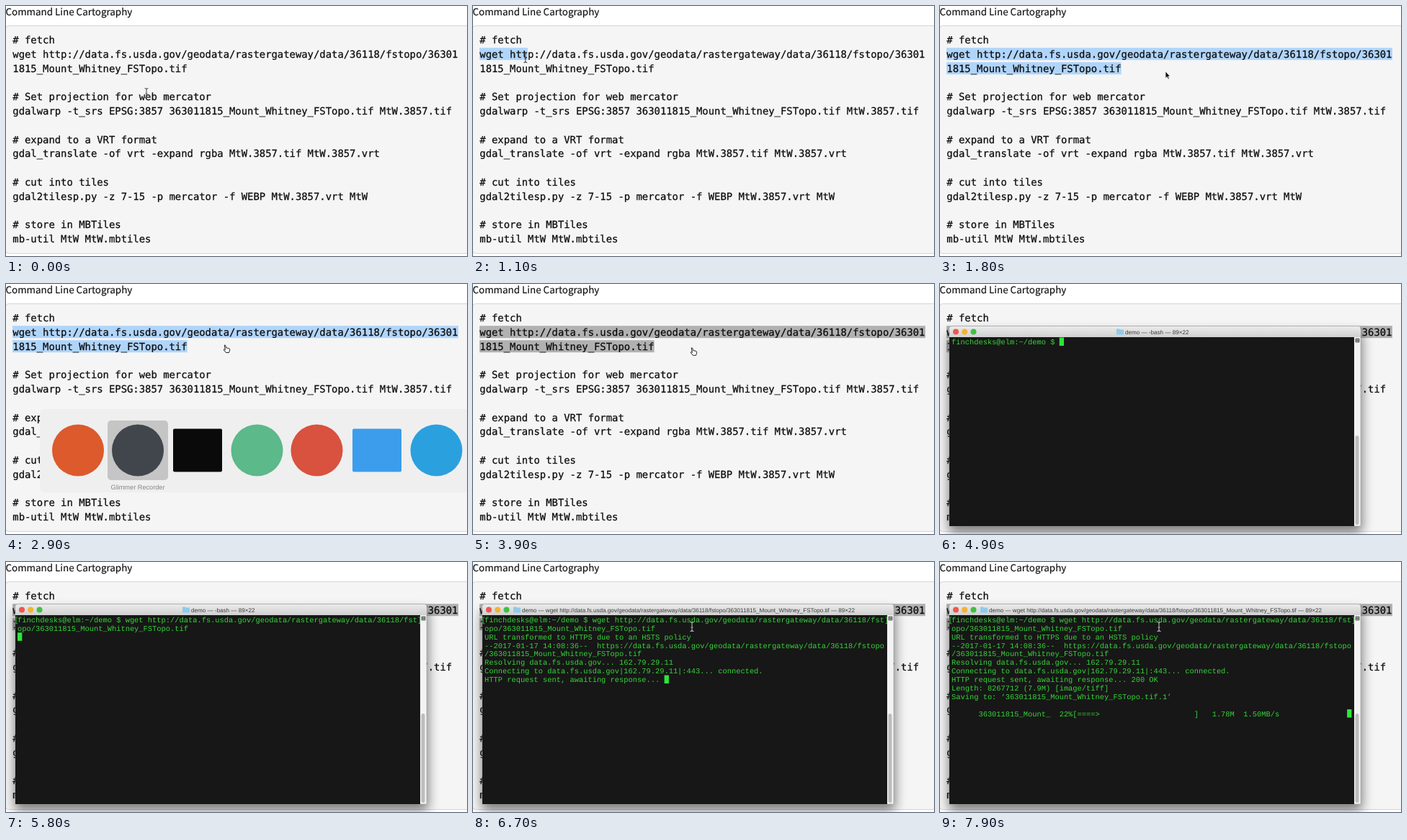
Write an HTML page that moves like this. It is 640 px wide and 348 px high and loops after 8 s.

```html
<!DOCTYPE html>
<html lang="en">
<head>
<meta charset="utf-8">
<title>Command Line Cartography</title>
<style>
  html, body { margin: 0; width: 100%; height: 100%; overflow: hidden; background: #fff; }
  svg { display: block; width: 100vw; height: 100vh; }
  text { white-space: pre; text-rendering: geometricPrecision; }
  .heading { font: 13.42px "Noto Sans CJK SC", "Noto Sans CJK JP", "Noto Sans", sans-serif; fill: #111; stroke: #111; stroke-width: .15; }
  .code { font: 13.895px "DejaVu Sans Mono", monospace; fill: #0c0c0c; stroke: #0c0c0c; stroke-width: .25; }
  .term { font: 10.4px "Liberation Mono", monospace; fill: #35d438; }
  .bar { font: 8.1px "Liberation Sans", sans-serif; fill: #3c3c3c; }
  .label { font: 9.2px "Liberation Sans", sans-serif; fill: #858585; text-anchor: middle; }
</style>
</head>
<body>
<svg viewBox="0 0 640 348" preserveAspectRatio="none">
  <defs>
    <linearGradient id="barFill" x1="0" y1="0" x2="0" y2="1">
      <stop offset="0" stop-color="#ebebeb"/><stop offset="1" stop-color="#d0d0d0"/>
    </linearGradient>
    <linearGradient id="ghostFill">
      <stop offset="0" stop-color="#6a6a6a"/><stop offset=".36" stop-color="#8c8c8c"/>
      <stop offset=".46" stop-color="#bdbdbd"/><stop offset="1" stop-color="#e0e0e0"/>
    </linearGradient>
    <filter id="shadow" x="-10%" y="-10%" width="120%" height="125%">
      <feGaussianBlur stdDeviation="8"/>
    </filter>
  </defs>

  <rect width="640" height="348" fill="#fff"/>
  <text class="heading" x="-.5" y="13">Command Line Cartography</text>
  <rect x="-.5" y="27.5" width="660" height="317" rx="4" fill="#f5f5f5" stroke="#d4d4d4"/>
  <g id="selection"><rect x="9" y="58.2" height="17"/><rect x="9" y="78.2" height="17"/></g>
  <g id="page"></g>

  <g id="terminal">
    <rect x="12" y="68" width="574" height="278" rx="5" opacity=".5" filter="url(#shadow)"/>
    <path d="M13 337V63q0-4 4-4H580q4 0 4 4V337z" fill="#f3f3f3" stroke="#a5a5a5" stroke-width=".6"/>
    <path d="M13 74V63q0-4 4-4H580q4 0 4 4V74z" fill="url(#barFill)"/>
    <rect x="13" y="74" width="562" height="263" fill="#171717"/>
    <circle cx="22" cy="66.5" r="4" fill="#f0564f"/>
    <circle cx="34.2" cy="66.5" r="4" fill="#f3b332"/>
    <circle cx="46.5" cy="66.5" r="4" fill="#3fc046"/>
    <path id="folder" d="M0 0h4l1 1h5v7H0z" fill="#8fcbe9"/>
    <text id="caption" class="bar" y="69.5"></text>
    <path d="M577 76h5v5h-5zM577 78.5h5" fill="#999" stroke="#555" stroke-width=".8"/>
    <rect id="thumb" x="576.5" y="211" width="5" height="124" rx="2.5" fill="#bdbdbd"/>
    <g id="output"></g>
    <g id="marks" class="term"><text x="11.5" y="84">[</text><text x="571" y="84">]</text></g>
    <rect id="block" width="6.3" height="11.5" fill="#2fe53a"/>
  </g>

  <g id="switcher">
    <path id="tray" d="M641 174H55q-8 0-8 8V282q0 8 8 8H641z" fill="#efefef"/>
    <g id="ghost">
      <rect x="538" y="174" width="102" height="116" fill="url(#ghostFill)"/>
      <path d="M47.5 188V281q0 8 8 8H538" fill="none" stroke="#484848"/>
    </g>
    <g id="chosen">
      <rect x="-42" y="190" width="84" height="83" rx="5" fill="#c5c5c5"/>
      <text id="appName" class="label" y="285.5"></text>
    </g>
    <g id="icons"></g>
  </g>

  <g id="pointer">
    <path id="beam" d="M-2.5-6.5q2.5 0 2.5 2v9q0 2-2.5 2M2.5-6.5q-2.5 0-2.5 2v9q0 2 2.5 2M-1.5 1h3" fill="none" stroke-width="1.1"/>
    <path id="arrow" d="M0 0V9.5L2.2 7.6 3.7 11 5.3 10.3 3.8 7H6.5z" fill="#111" stroke="#fff" stroke-width=".7"/>
    <path id="hand" d="M1.2.7q1.2-.8 1.6.6l.8 3 3.6.7q1.6.4 1.5 2L8.2 9.2 7.5 11H3.3L.4 7.3q-.4-1.2 1-.9l1 .8z" fill="#fff" stroke="#222" stroke-width="1"/>
  </g>
</svg>
<script>
const LOOP = 8000, STEP = 100;
const CHAR = 8.365, ROW = 19.79;      // page text grid
const COL = 6.24, LINE = 11.87;       // terminal text grid
const $ = id => document.getElementById(id);
const set = (el, attrs) => { for (const k in attrs) el.setAttribute(k, attrs[k]); };
const show = (el, on) => { el.style.display = on ? '' : 'none'; };
const add = (parent, tag, attrs, text = '') => {
  const el = document.createElementNS('http://www.w3.org/2000/svg', tag);
  set(el, attrs);
  el.textContent = text;
  return parent.appendChild(el);
};

const path = '://data.fs.usda.gov/geodata/rastergateway/data/36118/fstopo';
const file = '363011815_Mount_Whitney_FSTopo.tif';
const url = 'http' + path + '/' + file;

const pageLines = [
  '# fetch', 'wget ' + url.slice(0, 69), url.slice(69), '',
  '# Set projection for web mercator', `gdalwarp -t_srs EPSG:3857 ${file} MtW.3857.tif`, '',
  '# expand to a VRT format', 'gdal_translate -of vrt -expand rgba MtW.3857.tif MtW.3857.vrt', '',
  '# cut into tiles', 'gdal2tilesp.py -z 7-15 -p mercator -f WEBP MtW.3857.vrt MtW', '',
  '# store in MBTiles', 'mb-util MtW MtW.mbtiles'
];
pageLines.forEach((s, i) => add($('page'), 'text', { class: 'code', x: 9.3, y: 52 + i * ROW }, s));

const rows = Array.from({ length: 12 }, (_, i) =>
  add($('output'), 'text', { class: 'term', x: 16, y: 84 + i * LINE }));

// Terminal text: [time, row, text appended to that row]
const PASTE = 5200, ENTER = 5800, RUN = 6000, FETCH = 7200;
const log = [
  [0, 0, 'finchdesks@elm:~/demo $ '],
  [PASTE, 0, 'wget ' + url.slice(0, 60)],
  [PASTE, 1, url.slice(60)],
  [ENTER, 2, ''],
  [RUN, 2, 'URL transformed to HTTPS due to an HSTS policy'],
  [RUN, 3, '--2017-01-17 14:08:36--  https' + path],
  [RUN, 4, '/' + file],
  [RUN, 5, 'Resolving data.fs.usda.gov... '],
  [6200, 5, '162.79.29.11'],
  [6200, 6, 'Connecting to data.fs.usda.gov|162.79.29.11|:443... '],
  [6600, 6, 'connected.'],
  [6600, 7, 'HTTP request sent, awaiting response... '],
  [FETCH, 7, '200 OK'],
  [FETCH, 8, 'Length: 8267712 (7.9M) [image/tiff]'],
  [FETCH, 9, `Saving to: ‘${file}.1’`],
  [FETCH, 11, '']
];

function progress(t) {
  const k = Math.min(1, (t - FETCH) / 700);
  const pct = Math.round(22 * k);
  const bar = ('='.repeat(Math.floor(pct * 26 / 130)) + '>').padEnd(26);
  const size = (1.78 * k).toFixed(2), rate = (1.5 * Math.min(1, .5 + k / 2)).toFixed(2);
  return `      363011815_Mount_  ${String(pct).padStart(2)}%[${bar}]   ${size}M  ${rate}MB/s`;
}

// App icons as plain marks; the order changes after the first switch
const apps = {
  web: ['circle', '#dc5a2b'], player: ['circle', '#41464d'], shell: ['square', '#0a0a0a'],
  editor: ['circle', '#5bb98a'], browser: ['circle', '#d9513f'],
  files: ['square', '#3b9deb'], compass: ['circle', '#2ba0df']
};
const slots = [100, 183, 266, 348.5, 431.5, 515, 597.5];
for (const name in apps) {
  const [kind, fill] = apps[name];
  apps[name].el = kind === 'circle'
    ? add($('icons'), 'circle', { cy: 231.5, r: 36, fill })
    : add($('icons'), 'rect', { x: -34, y: 201.5, width: 68, height: 60, rx: 2, fill });
}

function drawSwitcher(t) {
  const second = t >= 4000;
  const on = (t >= 2800 && t < 3500) || (second && t < 4500);
  show($('switcher'), on);
  if (!on) return;
  const fading = t >= 4300;
  const order = Object.keys(apps);
  if (second) [order[0], order[1]] = [order[1], order[0]];
  order.forEach((name, i) => set(apps[name].el, { transform: `translate(${slots[i]})` }));
  const pick = t >= 4100 ? 2 : 1;
  set($('chosen'), { transform: `translate(${slots[pick]})` });
  $('appName').textContent = pick === 2 ? 'Terminal' : second ? 'Browser' : 'Glimmer Recorder';
  show($('tray'), !fading);
  show($('chosen'), !fading);
  show($('ghost'), fading);
  set($('switcher'), { opacity: t >= 4400 ? .4 : 1 });
}

// Pointer keys: [time, x, y]
const track = [
  [0, 195, 121], [200, 195, 121], [800, 10, 67], [900, 10, 67], [1500, 252, 87],
  [1600, 252, 87], [1800, 313, 91], [2200, 313, 91], [2800, 302, 84.5], [3000, 302, 84.5],
  [3700, 302, 88.3], [4600, 302, 88.3], [6600, 304, 90], [LOOP, 304, 90]
];

function pointerAt(t) {
  const i = track.findIndex((k, n) => n && t <= k[0]);
  const [t0, x0, y0] = track[i - 1], [t1, x1, y1] = track[i];
  const u = (t - t0) / (t1 - t0), e = u * u * (3 - 2 * u);
  return [x0 + (x1 - x0) * e, y0 + (y1 - y0) * e];
}

function drawPointer(t, x, y) {
  show($('pointer'), t < 4600 || t >= 6600);
  set($('pointer'), { transform: `translate(${x} ${y})` });
  show($('beam'), t < 1700 || t >= 6600);
  show($('arrow'), t >= 1700 && t < 2700);
  show($('hand'), t >= 2700 && t < 4600);
  set($('beam'), { stroke: t >= 6600 ? '#b5b5b5' : '#555' });
}

function drawSelection(t, x, y) {
  const [first, second] = $('selection').children;
  const full = 74 * CHAR, tail = 29 * CHAR;
  const done = t >= 1500, below = done || y > 77;
  const snapped = Math.max(0, Math.round((x - 9) / CHAR)) * CHAR;
  set(first, { width: t < 900 ? 0 : below ? full : snapped });
  set(second, { width: t < 900 || !below ? 0 : done ? tail : Math.min(tail, snapped) });
  set($('selection'), { fill: t >= 3500 ? '#b1b1b1' : '#b0d5fb' });
}

function drawTerminal(t) {
  show($('terminal'), t >= 4300);
  const lines = rows.map(() => '');
  let last = 0;
  for (const [at, row, text] of log) {
    if (t < at) break;
    lines[row] += text;
    last = row;
  }
  if (t >= FETCH) lines[11] = progress(t);
  rows.forEach((el, i) => { el.textContent = lines[i]; });
  const col = last === 11 ? 88 : lines[last].length;
  set($('block'), { x: 16 + col * COL, y: 74.5 + last * LINE });
  show($('marks'), t >= ENTER);
  show($('thumb'), t >= 4600);
  const running = t >= RUN;
  set($('folder'), { transform: `translate(${running ? 56 : 245} 62.5)` });
  set($('caption'), { x: running ? 68 : 257 });
  $('caption').textContent = `demo — ${running ? 'wget ' + url : '-bash'} — 89×22`;
}

function draw(t) {
  const [x, y] = pointerAt(t);
  drawSelection(t, x, y);
  drawTerminal(t);
  drawSwitcher(t);
  drawPointer(t, x, y);
}

function tick() {
  draw(Math.floor(performance.now() % LOOP / STEP) * STEP);
  requestAnimationFrame(tick);
}
tick();
</script>
</body>
</html>
```
